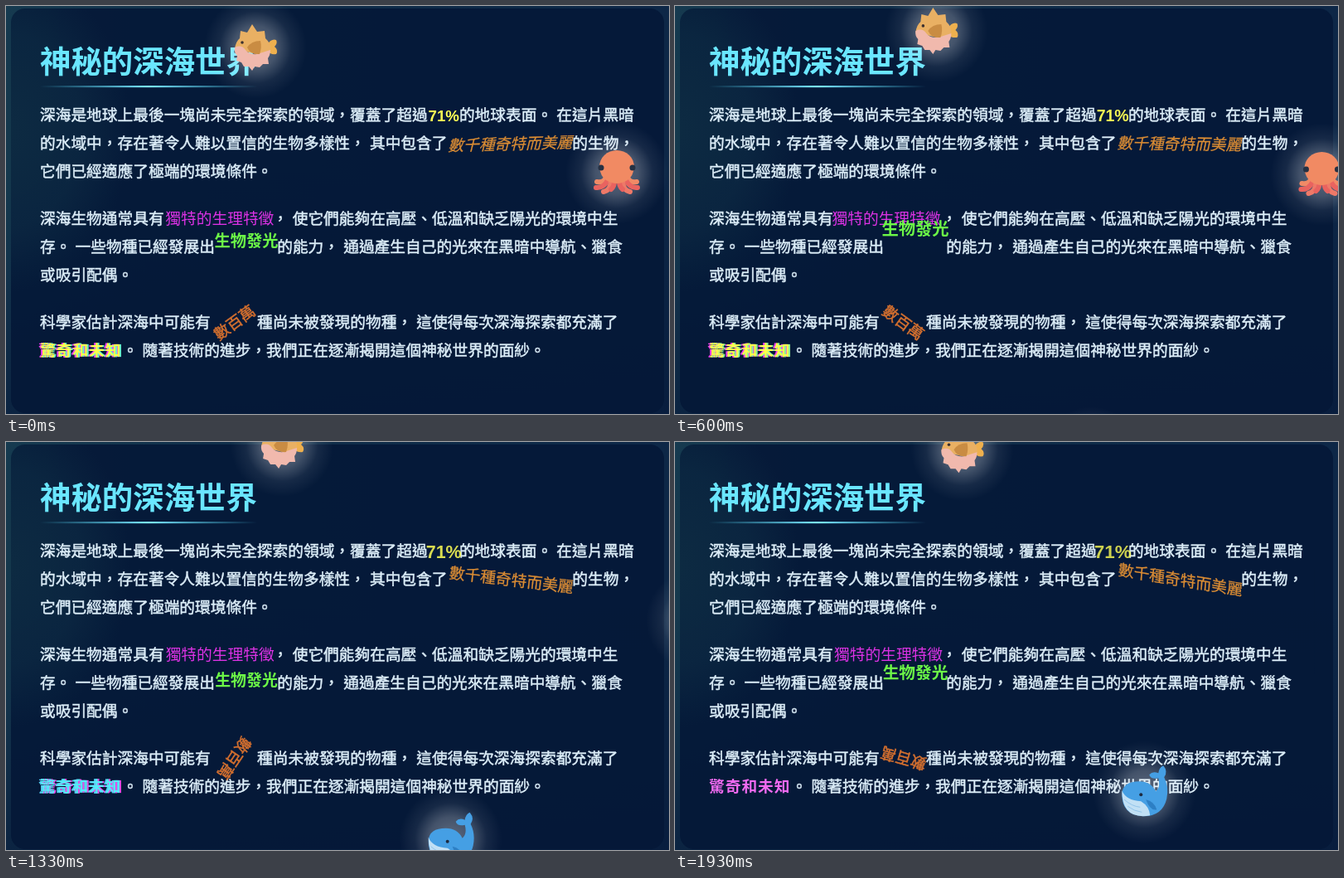
Animation of 800 by 492 pixels, one loop 2000 ms. Source, as an HTML page:

```html
<!DOCTYPE html>
<html lang="zh-Hant">
<head>
<meta charset="utf-8">
<title>神秘的深海世界</title>
<style>
html, body { margin: 0; width: 100%; height: 100%; overflow: hidden; background: #06193a; }
svg { display: block; width: 100%; height: 100%; }
text { font: 500 18.72px "Liberation Sans", "Noto Sans CJK TC", sans-serif; fill: #dcedf8; }
#title { font-size: 37.44px; font-weight: 700; fill: #6ae6ff; }
#copy text { stroke: #dcedf8; stroke-width: .5px; }
.mid { text-anchor: middle; }
#pulse { font-weight: 700; fill: #ffff55; }
#wave { font-weight: 400; fill: #dc8d34; stroke: #dc8d34; stroke-width: .25px; }
#shake { font-weight: 400; fill: #dc32e4; }
#bounce { font-weight: 700; fill: #6cf847; }
#spin { fill: #d5702f; stroke: #d5702f; stroke-width: .5px; }
.glitch { font-weight: 700; letter-spacing: 1px; }
</style>
</head>
<body>
<svg viewBox="0 0 800 492" preserveAspectRatio="none">
  <defs>
    <linearGradient id="page">
      <stop stop-color="#183d52"/><stop offset=".3" stop-color="#102f4a"/><stop offset="1" stop-color="#0d2747"/>
    </linearGradient>
    <linearGradient id="shade" x2="0" y2="1">
      <stop offset=".4" stop-color="#06193a" stop-opacity="0"/><stop offset="1" stop-color="#06193a" stop-opacity=".7"/>
    </linearGradient>
    <radialGradient id="haze">
      <stop stop-color="#123548" stop-opacity=".6"/><stop offset=".6" stop-color="#103349" stop-opacity=".45"/>
      <stop offset="1" stop-color="#103349" stop-opacity="0"/>
    </radialGradient>
    <linearGradient id="rule">
      <stop stop-color="#4fdcff" stop-opacity="0"/><stop offset=".5" stop-color="#7deaff"/>
      <stop offset="1" stop-color="#4fdcff" stop-opacity="0"/>
    </linearGradient>
    <radialGradient id="glow">
      <stop stop-color="#fff" stop-opacity=".36"/><stop offset=".42" stop-color="#fff" stop-opacity=".25"/>
      <stop offset=".7" stop-color="#fff" stop-opacity=".07"/><stop offset="1" stop-color="#fff" stop-opacity="0"/>
    </radialGradient>
  </defs>

  <rect width="800" height="492" fill="url(#page)"/>
  <rect width="800" height="492" fill="url(#shade)"/>
  <rect x="6" y="3" width="788" height="488" rx="17" fill="#051838" fill-opacity=".92"/>
  <ellipse cx="0" cy="150" rx="150" ry="195" fill="url(#haze)"/>

  <text id="title" x="41" y="81.2">神秘的深海世界</text>
  <rect x="41" y="96" width="262" height="2.2" fill="url(#rule)"/>
  <g id="copy"></g>

  <g id="pulseBox"><text id="pulse" class="mid" y="6.7">71%</text></g>
  <g id="waveBox"><text id="wave" class="mid" y="7">數千種奇特而美麗</text></g>
  <text id="shake" x="190.8" y="263.3">獨特的生理特徵</text>
  <g id="bounceBox"><text id="bounce" class="mid" y="7">生物發光</text></g>
  <g id="spinBox"><text id="spin" class="mid" y="7">數百萬</text></g>
  <text class="glitch" x="39" y="421.6">驚奇和未知</text>
  <text class="glitch" x="43" y="421.6">驚奇和未知</text>
  <text class="glitch" x="41" y="421.6">驚奇和未知</text>

  <g id="fish">
    <circle r="62" fill="url(#glow)"/>
    <path d="M14 -3Q19 -11 25 -9Q27 -5 23 -1Q28 3 25 8Q18 9 14 4Z" fill="#eeb04e"/>
    <path d="M-25 2Q-24 -7 -19 -11L-18 -20L-10 -18L-4 -28L2 -19L11 -20L12 -11Q19 -5 18 3L10 10Z" fill="#e9b063"/>
    <path d="M-25 0Q-17 -4 -12 3Q-8 9 2 8L18 3Q18 9 15 13L16 20L9 20L5 24L-1 23L-4 28L-8 23L-14 23L-17 18L-23 16L-22 10Q-26 6 -25 0Z" fill="#f1b9ad"/>
    <path d="M-10 0Q-5 -8 6 -8Q8 0 5 8Q-6 9 -10 0Z" fill="#c98c43"/>
    <circle cx="-16" cy="-6" r="1.8" fill="#3b3030"/>
  </g>

  <g id="octopus">
    <circle r="62" fill="url(#glow)"/>
    <g fill="none" stroke-linecap="round" stroke-width="6">
      <path d="M-12 4Q-15 13 -24 11M12 4Q15 13 24 11" stroke="#f08a66"/>
      <path d="M-11 9Q-16 19 -25 18M11 9Q16 19 25 18" stroke="#e9635f"/>
      <path d="M-7 9Q-7 21 -16 23M7 9Q7 21 16 23" stroke="#ee7968"/>
      <path d="M-3 10Q-3 17 -7 20M3 10Q3 17 7 20" stroke="#e9635f"/>
    </g>
    <path d="M-21 -7A21 20 0 0 1 21 -7Q20 4 13 9Q0 17 -13 9Q-20 4 -21 -7Z" fill="#f18a63"/>
    <circle cx="-19" cy="-6" r="3.5" fill="#263143"/>
    <circle cx="19" cy="-6" r="3.5" fill="#263143"/>
  </g>

  <g id="whale">
    <circle r="62" fill="url(#glow)"/>
    <path d="M-27 2Q-26 -13 -6 -13Q8 -13 14 -1Q20 -6 17 -17Q8 -15 6 -21Q10 -26 17 -23Q18 -30 23 -32Q29 -25 24 -18Q30 -6 27 8Q22 29 -1 29Q-27 28 -27 2Z" fill="#459fe4"/>
    <path d="M-27 -2Q-22 10 -4 11Q6 17 7 28Q-27 34 -27 -2Z" fill="#c1e0f5"/>
    <path d="M2 9Q12 11 15 21Q7 23 2 9Z" fill="#2d7fc4"/>
    <path d="M-24 9Q-15 17 -5 18M-20 17Q-12 23 -3 24" fill="none" stroke="#91c4ea"/>
    <circle cx="-4" cy="3" r="2" fill="#1d2b40"/>
  </g>
</svg>
<script>
const $ = id => document.getElementById(id);
const place = (id, transform) => $(id).setAttribute('transform', transform);

// x, vertical centre, text
const copy = [
  [41, 132, '深海是地球上最後一塊尚未完全探索的領域，覆蓋了超過'],
  [546.9, 132, '的地球表面。 在這片黑暗'],
  [41, 165.7, '的水域中，存在著令人難以置信的生物多樣性， 其中包含了'],
  [683.3, 165.7, '的生物，'],
  [41, 199.4, '它們已經適應了極端的環境條件。'],
  [41, 257, '深海生物通常具有'],
  [321.8, 257, '， 使它們能夠在高壓、低溫和缺乏陽光的環境中生'],
  [41, 290.5, '存。 一些物種已經發展出'],
  [327.2, 290.5, '的能力， 通過產生自己的光來在黑暗中導航、獵食'],
  [41, 324.2, '或吸引配偶。'],
  [41, 381.5, '科學家估計深海中可能有'],
  [303.1, 381.5, '種尚未被發現的物種， 這使得每次深海探索都充滿了'],
  [140.6, 415.2, '。 隨著技術的進步，我們正在逐漸揭開這個神秘世界的面紗。']
];
$('copy').innerHTML = copy.map(([x, y, s]) => `<text x="${x}" y="${y + 6.3}">${s}</text>`).join('');

// seconds, x, y
const paths = {
  fish: [[0, 301, 50], [.47, 312, 37], [.8, 320.5, 19], [1.07, 327, 9], [1.33, 333, 4], [1.6, 339, 8], [2, 348, 9.5]],
  octopus: [[0, 737, 201], [.47, 771, 202], [.8, 795, 204.5], [1.07, 815, 211], [1.33, 834, 215], [2, 882, 222]],
  whale: [[0, 473, 603], [.8, 512, 526], [1.07, 524, 502], [1.33, 536.5, 479], [1.6, 550, 454], [2, 569.5, 416]]
};
function along(points, t) {
  let i = 1;
  while (points[i][0] < t) i++;
  const a = points[i - 1], b = points[i], k = (t - a[0]) / (b[0] - a[0]);
  return [1, 2].map(j => a[j] + (b[j] - a[j]) * k);
}

// start, left edge, right edge, fill
const glitches = [
  [0, '#f03cf0', '#6df5c8', '#ffff4d'],
  [.33, 'none', 'none', '#ffff66'],
  [.6, '#f03cf0', '#8cf59a', '#ffff4d'],
  [.93, '#6ab8f5', '#e64ce6', '#62f5e4'],
  [1.2, '#55cdf5', '#e64ce6', '#55ebf8'],
  [1.47, '#4ab4f5', 'none', '#e63ce8'],
  [1.75, 'none', 'none', '#f06af0']
];
const glitchText = document.querySelectorAll('.glitch');

const TAU = Math.PI * 2;
const tan = deg => Math.tan(deg * Math.PI / 180);

function draw(now) {
  const t = Math.floor(now % 2000 * .015 + .06) % 30 / 15;
  const ease = (1 - Math.cos(t * Math.PI / 2)) / 2;

  place('pulseBox', `translate(528.2 132) scale(${1 + .2 * ease})`);
  $('pulse').style.opacity = 1 - .2 * ease;
  place('waveBox', `matrix(1 ${tan(11 * ease - 1.5)} ${tan(10 * ease - 14)} 1 609.8 166)`);
  place('shake', `translate(${.2 + 2 * Math.cos(TAU * (t / .48 - .87))} 0)`);
  const lift = 11.3 + 12.5 * Math.cos(TAU * (t - .7));
  place('bounceBox', `translate(290 ${289.8 - lift}) scale(${1 + lift * .004})`);
  place('spinBox', `translate(275.5 381.5) rotate(${120 * t - 36})`);

  const look = glitches.filter(g => g[0] <= t).pop();
  glitchText.forEach((el, i) => el.style.fill = look[i + 1]);

  for (const id in paths) place(id, `translate(${along(paths[id], t)})`);
  requestAnimationFrame(draw);
}
draw(0);
</script>
</body>
</html>
```
